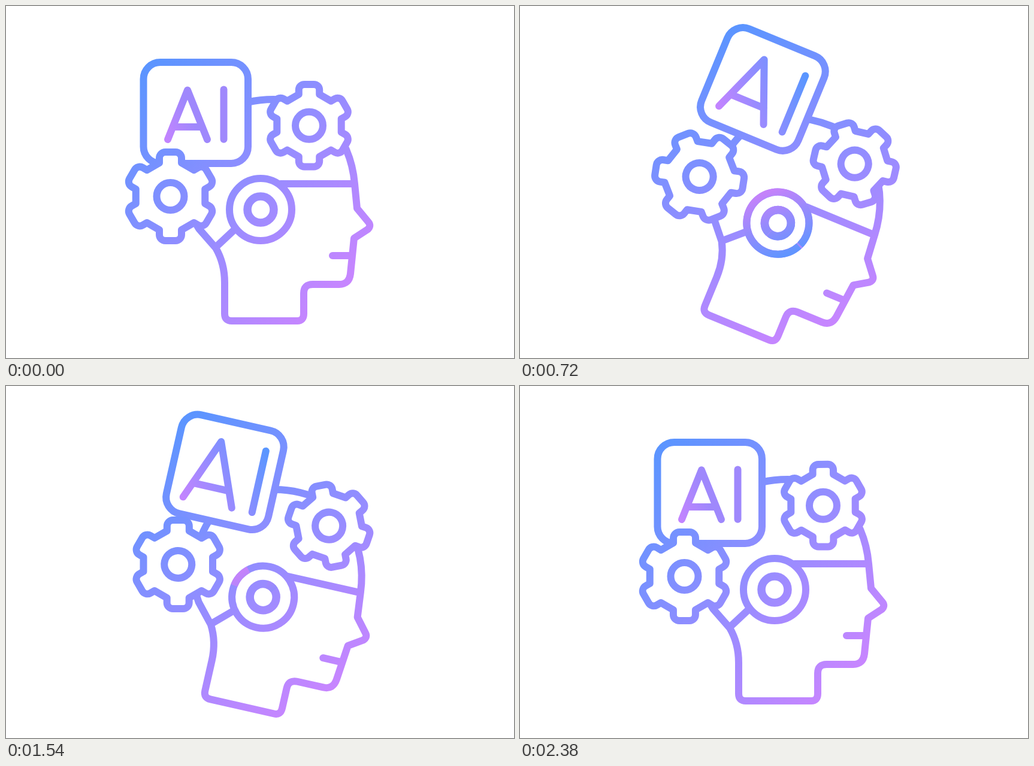
An HTML page with a canvas that plays this animation: 848x588 px, repeating every 2400 ms.

```html
<!DOCTYPE html>
<html lang="en">
<head>
<meta charset="utf-8">
<title>AI head</title>
<style>
  html, body { margin: 0; width: 100%; height: 100%; overflow: hidden; background: #fff; }
  canvas { display: block; }
</style>
</head>
<body>
<canvas id="stage" width="848" height="588"></canvas>
<script>
const ctx = document.getElementById('stage').getContext('2d');
const LOOP = 2400;
const LINE = 12;
const RAD = Math.PI / 180;
const PIVOT = { x: 370.5, y: 365 };
const EAR = { x: 425, y: 340 };

const clamp = v => Math.min(1, Math.max(0, v));
const mix = (a, b, k) => a + (b - a) * k;
const smooth = v => { v = clamp(v); return v * v * (3 - 2 * v); };

// Cubic bezier ease with handles (a, 0) and (b, 1).
function ease(x, a = 0.7, b = 0.3) {
  x = clamp(x);
  let lo = 0, hi = 1;
  for (let i = 0; i < 24; i++) {
    const m = (lo + hi) / 2, n = 1 - m;
    if (3 * n * n * m * a + 3 * n * m * m * b + m * m * m < x) lo = m; else hi = m;
  }
  return lo * lo * (3 - 2 * lo);
}

// Smooth track through [time, value] keys, without overshoot and at rest at both ends.
function track(keys) {
  const rise = keys.slice(1).map((k, i) => (k[1] - keys[i][1]) / (k[0] - keys[i][0]));
  const slope = keys.map((_, i) => {
    const p = rise[i - 1], q = rise[i];
    return p * q > 0 ? 2 * p * q / (p + q) : 0;
  });
  return t => {
    let i = 0;
    while (i < keys.length - 2 && t > keys[i + 1][0]) i++;
    const [t0, v0] = keys[i], [t1, v1] = keys[i + 1];
    const d = t1 - t0, u = (t - t0) / d, w = 1 - u;
    return v0 * (1 + 2 * u) * w * w + slope[i] * d * u * w * w
         + v1 * u * u * (3 - 2 * u) - slope[i + 1] * d * u * u * w;
  };
}

const leftSpin = track([[0, 0], [480, -41], [720, -103.6], [1200, -117.6], [1540, -132.6], [1740, -187], [2400, -240]]);
const rightSpin = track([[0, 0], [480, 68], [720, 140.4], [1200, 189], [1540, 216], [1740, 252.6], [2400, 360]]);
const sweepStart = track([[0, -90], [480, 2], [720, 25], [1540, 189], [1740, 233], [2400, 270]]);
const sweepSize = track([[0, 0], [480, 220], [720, 357], [900, 360], [1200, 360], [1540, 40], [1740, 21], [2400, 0]]);
const headTilt = t => 24 * (ease((t - 10) / 960) - ease((t - 1070) / 960));
const letterScale = t => 1 + 0.285 * ease(1 - Math.abs(t - 1200) / 1200);

function cardLift(t) {
  const u = t % 1200;
  return 42.5 * (u < 560 ? smooth(u / 560) : 1 - smooth((u - 560) / 640));
}

function gradient(x0, y0, x1, y1, from, to) {
  const g = ctx.createLinearGradient(x0, y0, x1, y1);
  g.addColorStop(0, from);
  g.addColorStop(1, to);
  return g;
}

const bodyPaint = gradient(225, 90, 612, 452, '#5895ff', '#cc85ff');
const sweepPaint = gradient(386, 301, 464, 379, '#c582fa', '#6095ff');

const headPath = new Path2D(
  'M582 297 C575 215 520 156 447 156 C385 156 330 185 312 227 ' +
  'C292 275 298 335 322 372 L350 404 C361 423 365 444 365 462 ' +
  'L365 514 Q365 526 377 526 L486 526 Q497 526 497 514 L497 480 Q497 465 512 465 ' +
  'L556 465 Q573 465 575 447 L581 388 L604 373 Q610 367 605 361 L586 338 Z ' +
  'M582 297 H458 M350 403 L382 373 M545 417 H577');

function ring(x, y, r, width = LINE, from = 0, size = 360) {
  ctx.lineWidth = width;
  ctx.beginPath();
  ctx.arc(x, y, r, from * RAD, (from + size) * RAD);
  ctx.stroke();
  ctx.lineWidth = LINE;
}

function gear(x, y, k, angle) {
  const half = 18.5 * k, base = -56 * k, tip = -74 * k, round = 10 * k;
  ctx.save();
  ctx.translate(x, y);
  ctx.rotate(angle * RAD);
  ctx.beginPath();
  for (let i = 0; i < 6; i++) {
    ctx.lineTo(-half, base);
    ctx.arcTo(-half, tip, 0, tip, round);
    ctx.arcTo(half, tip, half, base, round);
    ctx.lineTo(half, base);
    ctx.rotate(60 * RAD);
  }
  ctx.closePath();
  ctx.restore();
  ctx.fill();
  ctx.stroke();
  ring(x, y, 23);
}

function ear(t) {
  ring(EAR.x, EAR.y, 52);
  ring(EAR.x, EAR.y, 22, 13.5);
  const size = sweepSize(t), start = sweepStart(t);
  if (size < 0.5) return;
  ctx.save();
  ctx.lineCap = 'butt';
  ctx.strokeStyle = sweepPaint;
  ring(EAR.x, EAR.y, 52, LINE, start, size);
  ring(EAR.x, EAR.y, 22, 13.5, start + 85, size);
  ctx.restore();
}

function letters(t) {
  const s = letterScale(t);
  const k = smooth(t / 500) * smooth((LOOP - t) / 600);
  const tint = [[159, 90], [136, 150], [252, 255]].map(([a, b]) => Math.round(mix(a, b, k)));
  const line = (...points) => {
    ctx.beginPath();
    points.forEach(([x, y]) => ctx.lineTo(x * s, y * s));
    ctx.stroke();
  };
  ctx.save();
  ctx.translate(316.7, 179.5);
  ctx.strokeStyle = gradient(-47 * s, 44 * s, mix(0, 47, k) * s, mix(25, -40, k) * s,
    '#c284ff', `rgb(${tint})`);
  line([-46.7, 43.5], [-13.7, -39], [19.3, 43.5]);
  line([-38, 22.5], [10.6, 22.5]);
  line([46.8, -40], [46.8, 43.3]);
  ctx.restore();
}

function card(t) {
  ctx.save();
  ctx.translate(0, -cardLift(t));
  ctx.beginPath();
  ctx.roundRect(229.5, 94, 174.5, 169, 28);
  ctx.fill();
  ctx.stroke();
  letters(t);
  ctx.restore();
}

function draw(t) {
  ctx.fillStyle = '#fff';
  ctx.fillRect(0, 0, 848, 588);
  ctx.save();
  ctx.translate(PIVOT.x, PIVOT.y);
  ctx.rotate(headTilt(t) * RAD);
  ctx.translate(-PIVOT.x, -PIVOT.y);
  ctx.strokeStyle = bodyPaint;
  ctx.lineWidth = LINE;
  ctx.lineCap = ctx.lineJoin = 'round';
  ctx.stroke(headPath);
  ear(t);
  card(t);
  gear(274.5, 318, 1, leftSpin(t));
  gear(506, 199.7, 0.93, rightSpin(t));
  ctx.restore();
}

const began = performance.now();
function frame() {
  draw((performance.now() - began) % LOOP);
  requestAnimationFrame(frame);
}
frame();
</script>
</body>
</html>
```
